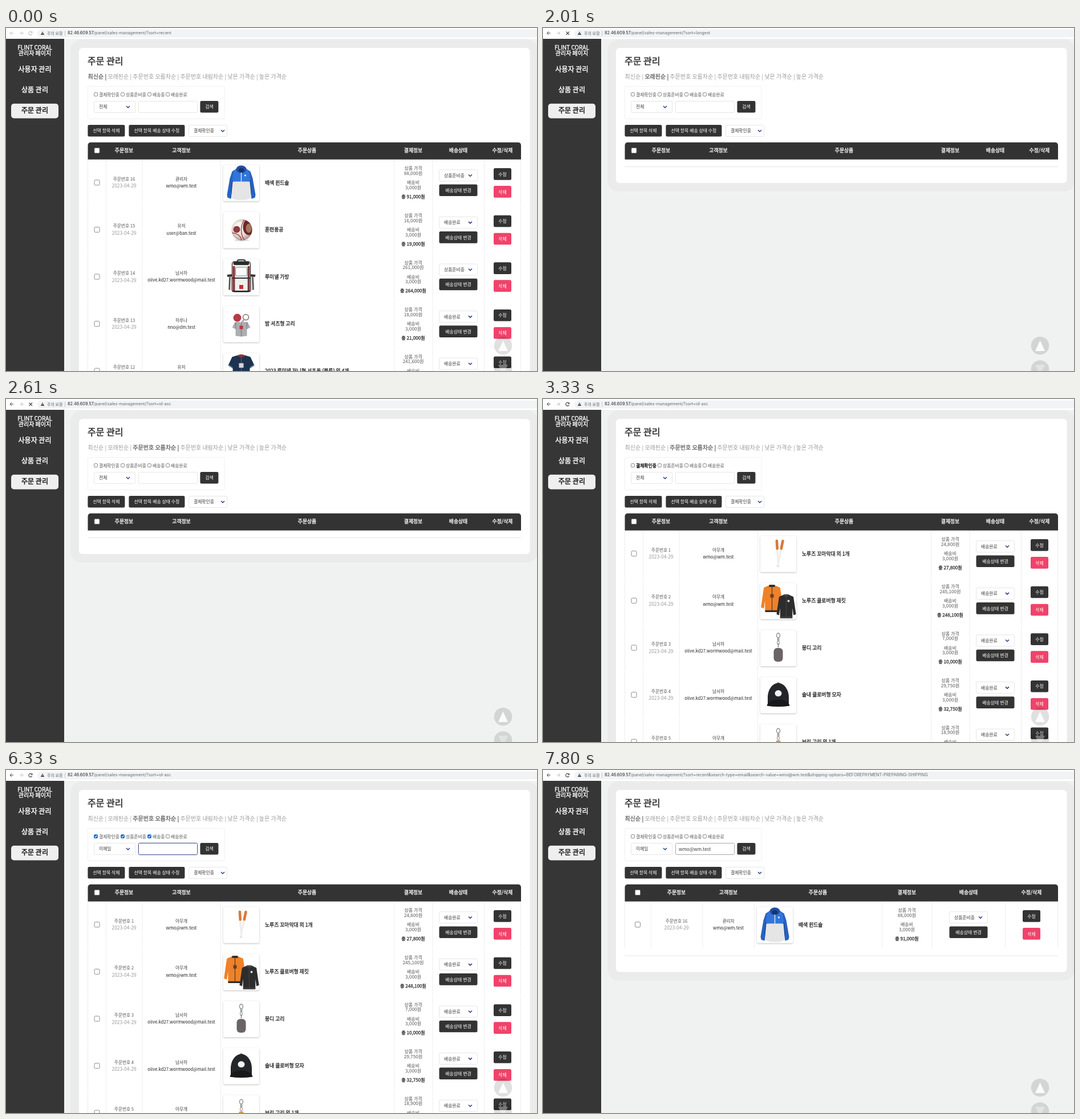
An HTML page with a canvas for the animation above (8000 ms loop, 931x602 px).

```html
<!DOCTYPE html>
<html lang="ko">
<head>
<meta charset="utf-8">
<title>주문 관리</title>
<style>
html, body { margin: 0; width: 100%; height: 100%; overflow: hidden; background: #f0f2f1; }
canvas { display: block; width: 931px; height: 602px; }
</style>
</head>
<body>
<canvas id="stage"></canvas>
<script>
const W = 931, H = 602, LOOP = 8000, ROW = 82.6;
const canvas = document.getElementById('stage'), c = canvas.getContext('2d');
const dpr = window.devicePixelRatio || 1;
canvas.width = W * dpr;
canvas.height = H * dpr;

const KR = '"Noto Sans CJK KR", "Noto Sans CJK JP", "Noto Sans", sans-serif';
const UI = 'Inter, "Noto Sans CJK KR", sans-serif';
const DARK = '#333', INK = '#3c3c3c', NAVY = '#24408f', LINE = '#eeeeee';

// Value of the latest step that has started at time t.
const at = (t, steps) => steps.filter(s => s[0] <= t).pop()[1];

// Medium weight is a regular face with a thin outline.
function text(s, x, y, size, color = INK, { medium = false, align = 'left', font = KR } = {}) {
  c.font = `${size}px ${font}`;
  c.textAlign = align;
  c.textBaseline = 'middle';
  c.fillStyle = color;
  c.fillText(s, x, y);
  if (medium) {
    c.strokeStyle = color;
    c.lineWidth = size * .035;
    c.lineJoin = 'round';
    c.strokeText(s, x, y);
  }
  return c.measureText(s).width;
}
const mid = (s, x, y, size, color, medium) => text(s, x, y, size, color, { align: 'center', medium });

function box(x, y, w, h, r, fill, stroke, lw = 1) {
  c.beginPath();
  c.roundRect(x, y, w, h, r);
  if (fill) { c.fillStyle = fill; c.fill(); }
  if (stroke) { c.strokeStyle = stroke; c.lineWidth = lw; c.stroke(); }
}
function shadowBox(x, y, w, h, r, alpha, blur) {
  c.save();
  c.shadowColor = `rgba(0,0,0,${alpha})`;
  c.shadowBlur = blur * dpr;
  c.shadowOffsetY = dpr;
  box(x, y, w, h, r, '#fff');
  c.restore();
}
function line(pts, color, lw = 1) {
  c.beginPath();
  for (let i = 0; i < pts.length; i += 2) c.lineTo(pts[i], pts[i + 1]);
  c.strokeStyle = color;
  c.lineWidth = lw;
  c.stroke();
}
function poly(pts, color) {
  c.beginPath();
  for (let i = 0; i < pts.length; i += 2) c.lineTo(pts[i], pts[i + 1]);
  c.fillStyle = color;
  c.fill();
}
// Polygon together with its mirror image.
function pair(pts, color) {
  poly(pts, color);
  poly(pts.map((v, i) => i % 2 ? v : -v), color);
}
function oval(x, y, rx, ry, fill, stroke, lw = 1) {
  c.beginPath();
  c.ellipse(x, y, rx, ry, 0, 0, 7);
  if (fill) { c.fillStyle = fill; c.fill(); }
  if (stroke) { c.strokeStyle = stroke; c.lineWidth = lw; c.stroke(); }
}
function clasp(y) {
  oval(0, y, 3, 4, null, '#8d8d8d', 1.4);
  box(-2, y + 4, 4, 6, 1, '#a8a8a8');
  oval(0, y + 13, 2, 3, null, '#999', 1.2);
}

const art = {
  anorak() {
    pair([-8, -25, -16, -20, -20, -8, -25, 21, -24, 26, -18, 28, -15, 8, -12, -6], '#2762c0');
    poly([-9, -25, 9, -25, 14, -19, 16, -2, -16, -2, -14, -19], '#3275da');
    poly([-16, -2, 16, -2, 17, 27, 8, 30, -8, 30, -17, 27], '#e5e5e6');
    pair([-16, -6, -15, -2, -17, 18, -18, 14], '#1c448f');
    oval(0, -24, 9, 6.5, '#1f4fa6');
    oval(0, -22, 5, 4, '#18346d');
    line([0, -18, 0, -2], '#e8eefa', 1.3);
    oval(7, -13, 1.5, 1.5, '#fff');
  },
  ball() {
    const g = c.createRadialGradient(-4, -6, 6, 0, 0, 20);
    g.addColorStop(0, '#fbf6f0');
    g.addColorStop(.6, '#ddd3cb');
    g.addColorStop(1, '#9b8c85');
    oval(1, 18, 13, 2, '#ddd');
    c.save();
    oval(1, 0, 18, 18.5, g);
    c.clip();
    oval(13, -5, 10, 14, '#6e262a');
    oval(13, -3, 5, 8, '#a5765f');
    oval(14, 0, 14, 22, null, '#b3484b', 1.5);
    oval(-18, 18, 18, 13, null, '#b3484b', 1.5);
    c.restore();
    oval(-8, -1, 6, 6, '#8e3a40');
  },
  bag() {
    pair([-15, -4, -22, 1, -23, 22, -15, 25], '#d9d9d9');
    pair([-25, -4, -15, -5, -15, -1, -24, 0], '#333');
    pair([-21, 0, -19, 0, -20, 23, -22, 22], '#444');
    box(-7, -30, 14, 8, 3, null, '#333', 2);
    box(-16, -27, 32, 53, 4, '#efefef', '#444', 1.5);
    box(-14, -27, 28, 6, 3, '#2c2c2c');
    box(-10, -17, 20, 15, 2, '#fafafa', '#8c8c8c');
    pair([-15, -19, -11, -19, -11, 25, -15, 25], '#b63b42');
    pair([-13.5, -19, -12.5, -19, -12.5, 25, -13.5, 25], '#333');
    line([-16, 2, 16, 2], '#333', 2.2);
    box(-3.5, 14, 7, 7, 0, '#c62c37');
    line([-16, 25, 16, 25], '#222', 2);
  },
  shirtRing() {
    oval(8, -12, 5, 5, null, '#8f8580', 1.8);
    line([5, -8, -1, -1], '#a09a96', 2.2);
    oval(-7, -11, 7, 7, '#b73943');
    pair([-4, -4, -11, -3, -16, 6, -10, 9, -10, 21, 0, 22, 0, -2], '#adaeb1');
    line([0, -2, 0, 22], '#737373');
    pair([-11, -3, -10, 9, -9, 9, -9, -3], '#858588');
    box(-3, 3, 6, 6, 0, '#b73943');
  },
  navyShirt() {
    pair([-6, -28, -16, -25, -23, -10, -15, -5, -14, 31, 0, 31, 0, -26], '#1d3350');
    pair([-23, -10, -15, -5, -15, -7, -22, -12], '#55718f');
    oval(0, -27, 6, 2.5, '#8f3340');
    box(-4, -14, 8, 8, 0, '#d5d6d8');
  },
  bats() {
    for (const [x, a] of [[-2, -.06], [6, .2]]) {
      c.save();
      c.translate(x, -13);
      c.rotate(a);
      box(-2.3, -12, 4.6, 18, 2, '#d67a3d');
      poly([-2, 6, 2, 6, 1, 34, -1, 34], '#f0eeec');
      oval(0, 35, 2, 1.2, '#e4e1df');
      c.restore();
    }
  },
  jumpers() {
    const coat = (x, y, k, body, trim) => {
      c.save();
      c.translate(x, y);
      c.scale(k, k);
      pair([-5, -22, -14, -18, -19, 16, -14, 18, -12, 4, -12, 23, 0, 23, 0, -20], body);
      box(-5, -23, 10, 4, 1, trim);
      box(-12, 21, 24, 3, 1, trim);
      line([0, -19, 0, 22], trim, 1);
      c.restore();
    };
    coat(-11, -5, 1.02, '#ef8128', '#30302f');
    box(-14, -12, 6, 6, 0, '#6a3d26');
    coat(14, 9, .9, '#2d2d2e', '#454545');
    oval(18, 0, 2, 2, '#ddd');
  },
  mascotRing() {
    clasp(-22);
    line([0, -8, 0, -1], '#888', 1.5);
    box(-8, 0, 16, 24, 6, '#6b6467');
  },
  cap() {
    c.beginPath();
    c.ellipse(0, 4, 18.5, 25, 0, Math.PI, 0);
    c.lineTo(18.5, 16);
    c.lineTo(-18.5, 16);
    c.fillStyle = '#252629';
    c.fill();
    c.beginPath();
    c.moveTo(-20, 19);
    c.bezierCurveTo(-17, 4, 17, 4, 20, 19);
    c.quadraticCurveTo(0, 22, -20, 19);
    c.fillStyle = '#18191b';
    c.fill();
    oval(0, -21, 2, 1, '#3a3b3e');
    oval(0, -3, 6, 5.5, '#f4f4f4');
  },
  plainRing() { clasp(-20); box(-4, -3, 8, 12, 2, '#d9974e'); }
};

const order = (no, name, mail, product, price, ship, pic) => ({ no, name, mail, product, price, ship, pic });
const MAIL = 'wmo@wm.test', LONG = 'olive.kd27.wormwood@mail.test';
const READY = '상품준비중', DONE = '배송완료';
const newest = [
  order(16, '관리자', MAIL, '배색 윈드솔', 88000, READY, 'anorak'),
  order(15, '유저', 'user@ban.test', '훈련용공', 16000, DONE, 'ball'),
  order(14, '남서하', LONG, '루미넬 가방', 261000, READY, 'bag'),
  order(13, '하루나', 'nno@dm.test', '밤 셔츠형 고리', 18000, DONE, 'shirtRing'),
  order(12, '유저', '', '2023 루미넬 저니형 셔츠옷 (블루) 외 4개', 241600, DONE, 'navyShirt')
];
const oldest = [
  order(1, '아무개', MAIL, '노루즈 꼬마막대 외 1개', 24800, DONE, 'bats'),
  order(2, '아무개', MAIL, '노루즈 클로버형 재킷', 245100, DONE, 'jumpers'),
  order(3, '남서하', LONG, '몽디 고리', 7000, DONE, 'mascotRing'),
  order(4, '남서하', LONG, '솔내 클로버형 모자', 29750, DONE, 'cap'),
  order(5, '아무개', '', '보리 고리 외 1개', 18900, DONE, 'plainRing')
];
const found = [newest[0]];

const listCols = { mids: [159.5, 207, 307.5, 528, 714, 793, 870.5], lines: [143.5, 175.5, 239, 376.5, 680.5, 748, 838.5, 902.5] };
const foundCols = { mids: [166, 234, 325, 482, 638, 746, 856.5], lines: [143.5, 189, 280, 370.5, 594.5, 682, 810.5, 902.5] };

const HOST = '82.46.609.57', PATH = '/panel/sales-management/?sort=';
const QUERY = `recent&search-type=email&search-value=${MAIL}&shipping-options=BEFOREPAYMENT-PREPARING-SHIPPING`;

const address = [[0, 'recent'], [1800, 'longest'], [2370, 'id-asc'], [7020, QUERY]];
const loading = [[0, 0], [1800, 1], [2100, 0], [2370, 1], [2760, 0], [6990, 1], [7410, 0]];
const rows = [[0, newest], [2010, []], [2070, oldest], [2610, []], [2670, oldest], [7380, []], [7410, found]];
const sorting = [[0, 0], [2010, 1], [2610, 2], [7380, 0]];
const labelHover = [[0, -1], [3120, 0], [3510, 1], [3960, 2], [4290, -1]];
const checked = [[0, 0], [3450, 1], [3780, 2], [4140, 3], [7380, 0]];
const selectMode = [[0, ''], [3000, 'hover'], [3120, ''], [4620, 'hover'], [4800, 'focus'], [5490, '']];
const inputMode = [[0, ''], [4290, 'hover'], [4440, 'focus'], [4800, ''], [5700, 'hover'], [5850, 'focus'], [6930, ''], [7800, 'hover']];
const caret = [[0, 0], [4440, 1], [4800, 0], [5850, 1], [6330, 0], [6360, 1], [6780, 0]];
const optionHover = [[0, -1], [4950, 0], [5190, 1]];

const edge = mode => ({ hover: '#aaa', focus: '#5a689c' })[mode] || '#e6e6e6';
function field(x, y, w, mode) {
  if (mode === 'focus') box(x - .2, y - .2, w + .4, 21.4, 3, null, 'rgba(90,104,156,.4)');
  box(x + .5, y + .5, w - 1, 20, 2, '#fff', edge(mode));
}
function select(x, y, w, label, mode = '', inset = 13) {
  field(x, y, w, mode);
  text(label, x + 9, y + 10.5, 7.8);
  const cx = x + w - inset, cy = y + 10.5;
  line([cx - 3, cy - 1.5, cx, cy + 1.5, cx + 3, cy - 1.5], mode ? '#111' : NAVY, 1.5);
}
function button(x, y, w, label, color = DARK) {
  box(x, y, w, 20.6, 2.5, color);
  mid(label, x + w / 2, y + 10.4, 7.9, '#fff');
}
function check(x, y, size, on) {
  box(x + .5, y + .5, size - 1, size - 1, 1.5, on ? '#1769d2' : '#fff', on ? '#1769d2' : '#808080', .9);
  if (on) line([x + 1.7, y + 3.6, x + 3, y + 5, x + 5.4, y + 1.9], '#fff', 1.1);
}

function arrow(x, dir, color) {
  line([x - 3 * dir, 9, x + 3 * dir, 9], color);
  line([x, 6, x + 3 * dir, 9, x, 12], color);
}
function browserBar(t) {
  const dim = '#bdbdbd', icon = t < 1620 ? dim : '#444';
  box(0, 0, W, 19, 0, '#fff');
  box(55, 2.5, W, 14, 7, '#f1f3f4');
  arrow(10, -1, icon);
  arrow(27, 1, dim);
  if (at(t, loading)) {
    line([40.5, 6.5, 46, 12], icon, 1.1);
    line([46, 6.5, 40.5, 12], icon, 1.1);
  } else {
    c.beginPath();
    c.arc(43, 9.2, 3, .5, 5.5);
    c.strokeStyle = icon;
    c.lineWidth = 1.1;
    c.stroke();
    poly([46.5, 5.5, 46.5, 8.8, 43.3, 8.8], icon);
  }
  poly([64, 6, 67.3, 12, 60.7, 12], '#4a4d50');
  line([64, 8, 64, 10], '#fff', .8);
  text('주의 요함', 72, 9.3, 7, '#5f6368');
  line([103.5, 5, 103.5, 14], '#c5c7ca');
  const w = text(HOST, 108, 9.3, 7.25, '#202124', { font: UI });
  text(PATH + at(t, address), 108 + w, 9.3, 7.25, '#666a6e', { font: UI });
}
function sidebar() {
  box(0, 19, 102, H, 0, '#363636');
  mid('FLINT CORAL', 50.5, 33.8, 10, '#fff', true);
  mid('관리자 페이지', 50.5, 44.1, 10, '#fff', true);
  mid('사용자 관리', 50.5, 72.2, 12, '#fff', true);
  mid('상품 관리', 50.5, 108.4, 12, '#fff', true);
  box(9, 132.8, 83, 25.6, 5, '#efefef');
  mid('주문 관리', 50.5, 144.8, 12, '#111', true);
}
function filters(t) {
  box(143.5, 102.5, 239.5, 57, 1, '#fff', '#f0f0f0');
  const xs = [154, 201, 248, 280], names = ['결제확인중', READY, '배송중', DONE];
  names.forEach((name, i) => {
    const hover = at(t, labelHover) === i;
    check(xs[i], 113, 7, i < at(t, checked));
    text(name, xs[i] + 9, 117, 7.8, hover ? '#000' : '#555', { medium: hover });
  });
  select(154, 128, 73, t < 5400 ? '전체' : '이메일', at(t, selectMode));
  field(232, 128, 104, at(t, inputMode));
  const w = t >= 6360 ? text(MAIL, 238, 138.7, 8) : 0;
  if (at(t, caret)) line([238.5 + w, 133, 238.5 + w, 144], '#222', .9);
  button(340.4, 128, 32, '검색');
  button(143.4, 170, 65, '선택 항목 삭제');
  button(215.4, 170, 98, '선택 항목 배송 상태 수정');
  select(320, 170, 68, '결제확인중', '', 8);
}
function dropdown(t) {
  if (t < 4830 || t >= 5400) return;
  shadowBox(154, 153, 99.5, 57, 2, .25, 4);
  ['전체', '이메일', '주문 번호'].forEach((s, i) =>
    text(s, 163, 163 + 17 * i, 7.2, at(t, optionHover) === i ? '#000' : '#555'));
}
function orderRow(o, y, { mids: m, lines }) {
  lines.forEach(x => line([x, y - 40, x, y + 41.5], LINE));
  check(m[0] - 5, y - 5, 10);
  mid('주문번호 ' + o.no, m[1], y - 6.5, 7.7, '#555');
  mid('2023-04-29', m[1], y + 6, 8.4, '#999');
  mid(o.name, m[2], y - 6.5, 7.7);
  mid(o.mail, m[2], y + 6, 7.7, '#222');
  const x = lines[3] + 4.5;
  shadowBox(x, y - 31, 63, 63.5, 2, .25, 3);
  c.save();
  c.beginPath();
  c.rect(x, y - 31, 63, 63.5);
  c.clip();
  c.translate(x + 31.5, y + .5);
  art[o.pic]();
  c.restore();
  text(o.product, x + 73, y, 8.8, '#222', { medium: true });
  const won = n => n.toLocaleString('en-US') + '원';
  mid('상품 가격', m[4], y - 25, 8, '#555');
  mid(won(o.price), m[4], y - 16.5, 8.2, '#555');
  mid('배송비', m[4], y, 8, '#555');
  mid(won(3000), m[4], y + 8.5, 8.2, '#555');
  mid('총 ' + won(o.price + 3000), m[4], y + 24.8, 8.1, '#333', true);
  select(m[5] - 34, y - 23, 68, o.ship);
  button(m[5] - 33.5, y + 3.2, 67, '배송상태 변경');
  button(m[6] - 15.5, y - 25.2, 31, '수정');
  button(m[6] - 15.5, y + 5.8, 31, '삭제', '#f0436a');
}
function table(list) {
  const cols = list === found ? foundCols : listCols;
  list.forEach((o, i) => orderRow(o, 271.3 + ROW * i, cols));
  box(143.5, 200.8, 759.5, 30, [5, 5, 0, 0], DARK);
  check(cols.mids[0] - 5, 210, 10);
  ['주문정보', '고객정보', '주문상품', '결제정보', '배송상태', '수정/삭제'].forEach((s, i) =>
    mid(s, cols.mids[i + 1], 215, 8.8, '#fff', true));
  if (list.length < 2) {
    const end = 243.5 + ROW * list.length;
    line([143, end, 903, end], '#e6e6e6');
  }
}
function scrollButtons() {
  oval(871.5, 557.5, 15.8, 15.8, 'rgba(0,0,0,.12)');
  poly([871.5, 548.5, 880, 567, 863, 567], 'rgba(255,255,255,.9)');
  oval(871.5, 599, 15.8, 15.8, 'rgba(0,0,0,.12)');
  poly([863, 591, 880, 591, 871.5, 609], 'rgba(255,255,255,.35)');
}

function draw(t) {
  const list = at(t, rows);
  const bottom = list.length > 1 ? 680 : 272 + ROW * list.length;
  c.setTransform(dpr, 0, 0, dpr, 0, 0);
  box(0, 0, W, H, 0, '#f0f2f1');
  box(113, 20, 820, bottom - 5, 20, '#ebebeb');
  box(128, 35, 790.5, bottom - 35, 6, '#fff');
  text('주문 관리', 143, 58, 16, '#333', { medium: true });
  let x = 143.6;
  ['최신순', '오래된순', '주문번호 오름차순', '주문번호 내림차순', '낮은 가격순', '높은 가격순'].forEach((s, i) => {
    const medium = i === at(t, sorting);
    x += text(i < 5 ? s + ' | ' : s, x, 85.5, 10, medium ? '#666' : '#999', { medium });
  });
  filters(t);
  table(list);
  dropdown(t);
  scrollButtons();
  sidebar();
  browserBar(t);
}

const start = performance.now();
function tick() {
  draw((performance.now() - start) % LOOP);
  requestAnimationFrame(tick);
}
tick();
</script>
</body>
</html>
```
